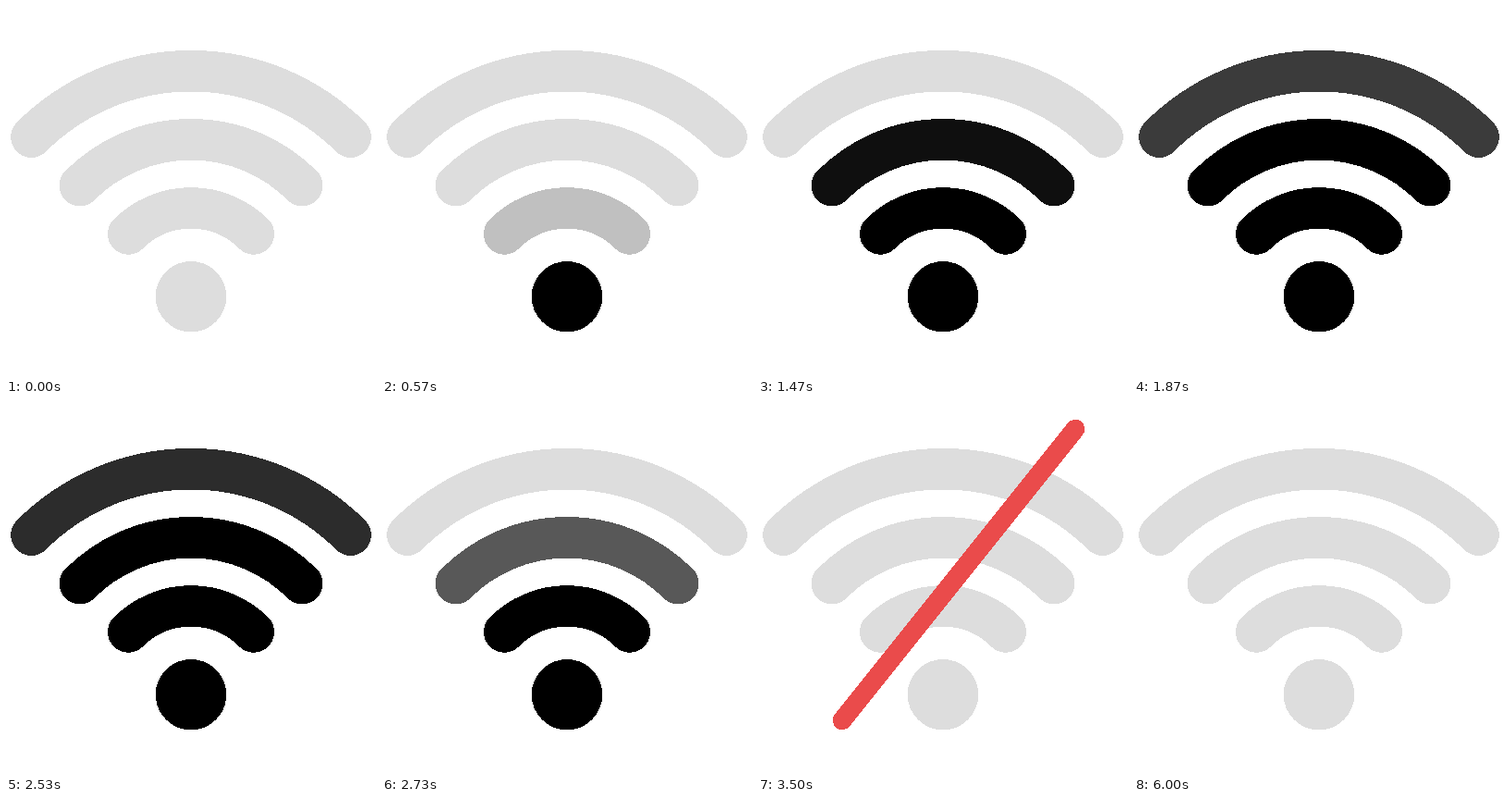
An HTML page that plays this animation: 400x400 px, repeating every 6030 ms.

```html
<!DOCTYPE html>
<html lang="en">
<head>
<meta charset="utf-8">
<title>Wi-Fi signal</title>
<style>
  html, body { margin: 0; height: 100%; overflow: hidden; background: #fff; }
  svg { display: block; width: 100vw; height: 100vh; shape-rendering: crispEdges; }
</style>
</head>
<body>
<svg viewBox="0 0 400 400" fill="none" stroke-linecap="round">
  <circle class="part" cx="200" cy="314.2" r="19.1" stroke-width="38.2"/>
  <line id="slash" x1="343" y1="27" stroke="#ea4b4b" stroke-width="20.5"/>
</svg>
<script>
const LOOP = 6030, FPS = 30;
const svg = document.querySelector('svg');
const slash = document.getElementById('slash');
const clamp = x => Math.max(0, Math.min(1, x));

// Quarter-circle bands around the dot
for (const r of [95.8, 169.9, 244]) {
  const d = r * Math.SQRT1_2;
  const arc = document.createElementNS(svg.namespaceURI, 'path');
  arc.setAttribute('class', 'part');
  arc.setAttribute('stroke-width', 44.6);
  arc.setAttribute('d', `M${200 - d} ${314.2 - d}A${r} ${r} 0 0 1 ${200 + d} ${314.2 - d}`);
  svg.insertBefore(arc, slash);
}
const parts = [...document.querySelectorAll('.part')];

// Each part rests one step short of black until the next change
function stepAt(ms) {
  const step = Math.floor((ms + 4) * FPS / 1000);
  if (step >= 60 && step <= 75) return 59;
  return step > 0 && step < 60 && step % 15 === 0 ? step - 1 : step;
}

function draw(ms) {
  const step = stepAt(ms);
  parts.forEach((part, i) => {
    const rise = clamp((step - 15 * i) / 15);
    const fall = clamp((step - 75 - 5 * (3 - i)) / 5);
    const grey = Math.round(221 * (1 - rise + fall));
    part.setAttribute('stroke', `rgb(${grey},${grey},${grey})`);
  });
  const p = clamp((step - 95) / 10);
  slash.setAttribute('x2', 343 - 252 * p);
  slash.setAttribute('y2', 27 + 315 * p);
  slash.setAttribute('visibility', p > 0 && step < 180 ? 'visible' : 'hidden');
}

const start = performance.now();
function tick() {
  draw((performance.now() - start) % LOOP);
  requestAnimationFrame(tick);
}
tick();
</script>
</body>
</html>
```
